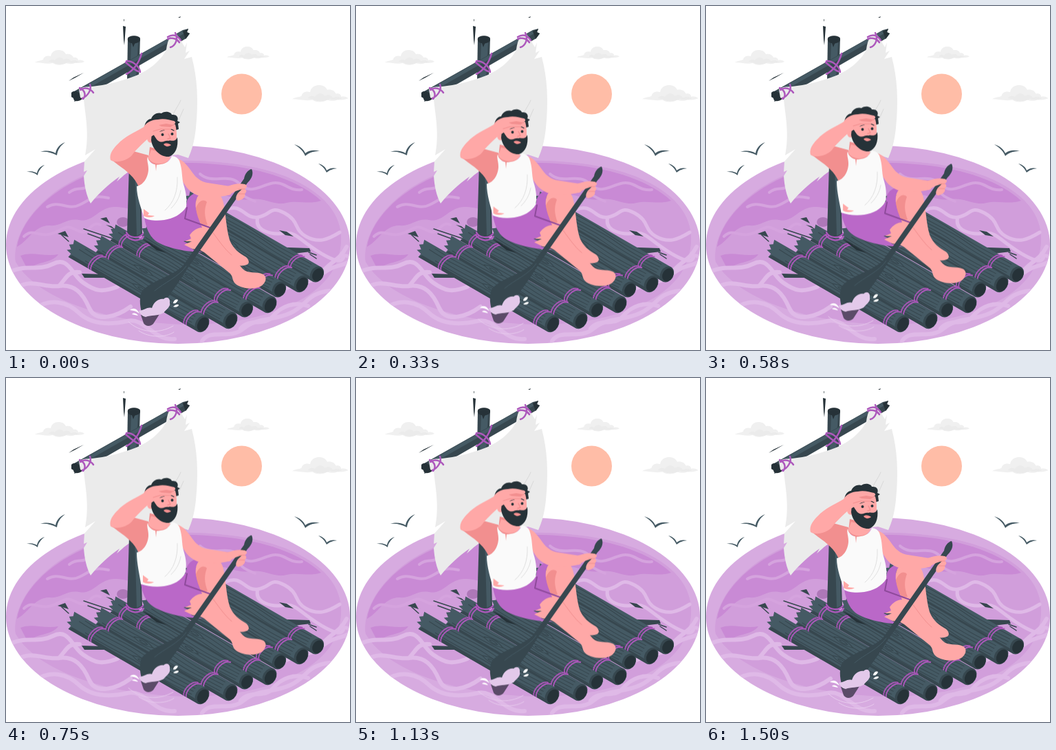
Animation of 500 by 500 pixels, one loop 1.54 s. Source, as an HTML page:

```html
<!DOCTYPE html>
<html lang="en">
<head>
<meta charset="utf-8">
<title>Castaway</title>
<style>
html, body { margin: 0; width: 100%; height: 100%; overflow: hidden; background: #fff; }
svg { display: block; width: 100vw; height: 100vh; }
.dark { fill: #263238; }
.wood { fill: #37474f; }
.bark { fill: #455a64; }
.skin { fill: #ffa8a7; }
.shade { fill: #f28f8f; }
.line { fill: none; stroke-linecap: round; stroke-linejoin: round; }
</style>
</head>
<body>
<svg viewBox="0 0 500 500">
  <defs>
    <clipPath id="lake"><ellipse cx="250" cy="347" rx="250" ry="144"/></clipPath>
    <g id="cloud">
      <path fill="#f0f0f0" d="M0 18C5 15 8 16 12 14C13 8 20 8 23 9C24 3 29 0 34 0C40 0 43 2 45 6C50 5 55 7 56 11C60 10 63 12 63 15C67 14 70 15 72 17C68 19 63 19 58 19C54 21 48 20 45 19C39 23 30 22 26 19C18 21 8 18 0 18Z"/>
      <path fill="#ebebeb" d="M20 17C24 12 27 14 29 15C33 9 40 10 42 14C46 11 51 13 52 16C56 15 61 15 64 17C58 19 54 19 48 18C40 22 31 21 26 18Z"/>
    </g>
  </defs>

  <use href="#cloud" x="42" y="64"/>
  <use href="#cloud" transform="translate(321 59) scale(.86)"/>
  <use href="#cloud" transform="translate(416 115) scale(1.13)"/>
  <circle cx="342.500" cy="128" r="29.500" fill="#ffbda7"/>

  <g clip-path="url(#lake)">
    <rect y="200" width="500" height="300" fill="#d7abe0"/>
    <path fill="#d19edb" d="M14 372C8 325 55 268 122 243C210 217 330 219 405 247C475 275 498 318 483 366C470 410 420 440 350 455C240 478 60 450 14 372Z"/>
    <path fill="#c98ad5" d="M16 350C22 312 60 272 112 249C180 227 250 224 316 231C375 237 428 255 458 283C440 289 424 282 408 286C389 291 377 278 356 281C330 284 321 270 299 276L205 293C184 302 172 288 150 293C132 298 124 315 106 311C88 308 79 321 64 319C42 318 34 340 16 350Z"/>
    <path fill="#c98ad5" d="M21 363C38 356 56 365 76 361C66 375 41 371 32 384Z"/>
    <g class="line" stroke="#dfb9e7" stroke-width="6">
      <path d="M0 390C25 373 45 387 68 375S95 390 112 402S139 417 162 408M15 410C38 395 54 410 77 407S112 418 121 439S159 453 181 437M40 440C66 424 89 430 106 446S149 464 176 458S213 487 245 484M77 407C88 396 89 385 107 387"/>
      <path d="M285 487C297 468 325 486 345 469S389 458 414 446S437 418 470 414M341 469C354 453 376 466 388 451S420 429 439 436M403 412C427 400 440 405 459 390S484 380 500 371M452 396C470 370 484 372 495 350"/>
      <path stroke-width="5" d="M320 296C344 286 346 310 366 307S383 289 405 301S418 325 436 335S467 340 485 329M366 307C360 328 388 333 405 330S433 347 466 364S485 357 497 364"/>
    </g>
    <g class="line" stroke="#d5a3de" stroke-width="4">
      <path d="M26 335C40 322 47 337 66 331S85 316 103 326S122 311 137 318M60 292C78 281 89 298 107 289S127 274 149 279M282 244C299 260 323 242 339 258S366 263 385 258S411 270 430 267M341 258C333 273 350 279 362 284M92 271C104 261 111 270 122 260"/>
    </g>
    <ellipse cx="170" cy="314" rx="9" ry="7" fill="#ae78b8"/>
  </g>

  <g class="bark" id="birds">
    <path d="M50 212C59 209 67 211 72 214C73 207 78 201 86 198C79 203 75 209 74 217C66 213 59 211 50 212Z"/>
    <path d="M30 241C36 239 42 241 45 243C46 237 50 233 56 231C50 236 47 240 46 246C41 242 36 241 30 241Z"/>
    <path d="M419 201C428 204 433 209 435 214C441 209 449 209 456 211C449 211 441 212 435 218C432 211 427 206 419 201Z"/>
    <path d="M454 229C461 231 465 235 466 239C471 235 476 235 481 236C475 237 471 238 466 242C463 236 460 233 454 229Z"/>
  </g>

  <path class="wood" d="M177 47L195 47L193 107L176 107Z"/>
  <path class="bark" d="M182 54L192 52L189 103L180 103Z"/>
  <path class="dark" d="M177 47C179 42 193 42 195 47C196 54 189 53 187 55L185 60L183 54C179 54 176 51 177 47ZM170 29L174 30L172 57L171 49ZM171 20L172 19L172 23ZM250 17L254 15L253 17ZM91 109L98 104L113 97L101 104Z"/>
  <path class="wood" d="M96 126L101 123L257 35L265 33L263 38L267 40L262 47L108 136L99 139L101 134L95 132Z"/>
  <path class="bark" d="M110 119L256 36L259 40L112 124Z"/>
  <path class="dark" d="M95 126C100 121 109 125 111 135C105 140 98 139 98 134L95 132ZM257 37L265 33L263 38L267 40L261 48Z"/>
  <path fill="#ebebeb" d="M106 121C112 116 121 118 125 117C145 115 165 110 184 103C203 97 226 80 233 63C235 50 238 41 248 41C253 47 256 54 260 60L263 53L261 68L267 65L259 77L270 74C278 104 280 137 276 177C274 197 270 210 265 221L250 216C218 220 185 233 168 249L161 255L165 248C149 259 134 273 123 287C117 276 114 262 113 247L118 239L113 241L114 226L130 208L115 217C121 187 116 163 113 136L108 133Z"/>
  <path class="line" stroke="#d8d8d8" d="M254 137C251 145 245 151 242 160M258 150L250 168"/>
  <g class="line" stroke="#ad58bc" stroke-width="2.500">
    <path d="M108 122C114 117 123 120 127 126M107 119C116 123 116 131 112 135M122 114C125 121 119 131 111 134"/>
    <path d="M175 80C184 79 194 88 195 96M197 69C194 82 185 94 175 99M174 82C181 88 187 93 192 95"/>
    <path d="M235 45C243 40 250 43 254 50M246 39C251 48 246 58 239 60M235 48C242 45 249 48 252 53"/>
  </g>

  <path class="wood" d="M110 389L143 390L150 395L114 395ZM380 350L441 352L443 357L400 362ZM397 326L408 328L418 335L406 333ZM75 331L86 327L91 336ZM137 309L146 307L151 316ZM145 318L153 320L162 327Z"/>
  <path class="line" stroke="#37474f" stroke-width="1.500" d="M113 324L155 338M119 331L149 342M440 358L451 362M442 361L451 367M81 333L91 342"/>
  <g id="raft"></g>
  <path class="dark" d="M200 340L209 344L233 359L219 355Z"/>
  <path class="wood" d="M179 230L195 230L198 333C193 338 181 337 176 331Z"/>
  <path class="bark" d="M187 230L193 230L196 331L190 334Z"/>
  <path class="line" stroke="#ad58bc" stroke-width="2.200" d="M175 329C179 337 193 339 199 331M174 333C181 342 193 343 200 335"/>

  <g id="man">
    <path id="shorts" fill="#ba68c8"/>
    <path class="skin" d="M276 294C274 279 281 270 293 268C304 267 314 274 316 286C320 305 320 323 325 340C330 353 339 359 349 365C354 370 354 374 350 376C341 379 331 378 325 371C311 356 289 338 285 322C281 313 279 304 276 294Z"/>
    <path class="shade" d="M276 294C279 285 286 279 292 285C288 295 288 305 293 318L285 320C280 311 277 303 276 294Z"/>
    <path class="line" stroke="#8e4a9b" stroke-width="2" d="M263 293L260 309L296 322"/>
    <path class="skin" d="M270 342L260 342L269 338L267 333C273 324 284 319 294 324C303 329 309 339 317 351L344 382C352 390 363 385 374 390C380 394 378 402 371 407C360 413 344 411 335 405C328 400 331 395 326 389L288 358C281 353 275 354 271 353L259 347Z"/>
    <path class="line" stroke="#f28f8f" d="M297 324C307 338 318 354 328 362"/>

    <path class="shade" d="M154 224L185 211L207 217C211 236 207 257 193 263C187 249 176 240 163 231Z"/>
    <path class="shade" d="M209 205L233 211L235 226C229 234 215 235 207 223Z"/>
    <path class="skin" d="M207 221L211 209L232 215L239 220C236 231 213 233 207 221Z"/>
    <path class="skin" d="M247 221C260 224 266 236 274 246C279 252 286 256 293 257L325 262L327 274C308 279 289 279 278 275C265 270 258 258 253 248Z"/>
    <path id="shirt" fill="#fafafa"/>
    <path class="line" stroke="#e0e0e0" d="M249 249C250 269 244 286 231 297M254 268C252 280 246 288 240 294"/>
    <path class="shade" d="M217 229L219 230L218 240Z"/>
    <path id="rip" class="skin" d="M200 295L208 301L206 304L216 305C211 308 205 308 200 305Z"/>

    <path class="dark" d="M202 184C199 172 205 164 211 164C213 157 221 154 226 156C231 152 240 154 241 158C249 157 251 163 249 167L253 169L250 171L251 179L245 181L212 190Z"/>
    <path class="skin" d="M214 174L246 172C249 184 249 198 244 209C234 215 220 209 214 202Z"/>
    <path class="skin" d="M214 190C208 185 203 190 206 196C208 200 213 199 215 197Z"/>
    <path class="dark" d="M212 184C216 187 217 194 223 197C229 199 231 195 236 196C241 194 245 199 249 191C251 205 246 216 237 219C225 220 213 209 211 195Z"/>
    <path fill="#f28f8f" d="M229 201C233 198 237 200 240 202C236 205 232 205 229 201Z"/>
    <circle class="dark" cx="227.500" cy="187" r="2"/><circle class="dark" cx="241.500" cy="186" r="2"/>
    <path class="line" stroke="#263238" stroke-width="1.300" d="M224 182L230 180M240 179L244 181"/>
    <path class="line" stroke="#f28f8f" stroke-width="1.300" d="M236 186L239 192L235 193"/>
    <path class="skin" d="M152 224C149 214 158 205 166 197C178 187 190 182 200 176C204 169 212 165 221 165C230 163 238 166 244 167C248 169 246 172 242 173C248 173 247 177 242 178C237 180 228 179 222 183C216 187 211 189 205 194C196 202 188 210 183 217C176 225 160 229 152 224Z"/>
    <path class="shade" d="M222 173L233 171L244 173L239 176L226 175Z"/>
    <path class="line" stroke="#f28f8f" d="M214 182L224 179L239 179"/>

    <path class="line" stroke="#e7cbed" stroke-width="1" d="M178 459C194 474 221 478 243 465M193 472C209 483 232 482 244 474"/>
    <path fill="#5b4b68" d="M196 449L223 448L214 462C209 467 202 465 200 461Z"/>
    <path class="wood" d="M357 237C352 238 347 244 346 251L257 378C240 394 208 400 197 416C193 427 195 439 199 452L222 447C226 432 245 413 264 381L351 257C358 250 360 243 357 237Z"/>
    <path class="line" stroke="#455a64" d="M262 378C251 394 230 402 216 414"/>
    <path fill="#e3c9ea" d="M193 443C202 442 205 437 212 439C215 430 222 425 229 426C234 421 239 425 238 431C240 437 232 442 229 446C220 451 211 449 203 452C198 451 195 448 193 443Z"/>
    <path fill="#fff" d="M180 442C186 437 191 441 194 447C187 442 184 443 180 442ZM183 448C186 445 190 447 192 450C188 449 186 449 183 448ZM243 432C244 426 249 426 250 427C249 431 246 433 243 432ZM243 437C247 433 251 433 251 435C249 438 246 438 243 437Z"/>
    <path class="skin" d="M322 262C331 259 338 257 347 259C352 261 350 264 347 266C351 268 349 271 347 273C349 278 343 282 337 283C332 281 335 275 337 272L343 266L334 269L323 275Z"/>
    <path class="line" stroke="#f28f8f" d="M338 266L347 266M338 273L347 273"/>
  </g>
</svg>
<script>
const raft = document.getElementById('raft');

// each log: right end x, y, radius, length, rope positions
const logs = [
  [452, 390, 12, 222, [-40]],
  [429, 404, 13, 220, [-35]],
  [397, 412, 12, 210, [-30]],
  [383, 434, 13, 215, [-35]],
  [349, 441, 12, 228, [-45, -175, -205]],
  [326, 457, 13, 226, [-40, -200]],
  [285, 462, 13, 224, [-22, -182]]
];

const path = (d, fill, stroke, width) =>
  `<path d="${d}" fill="${fill || 'none'}" ${stroke ? `stroke="${stroke}" stroke-width="${width}"` : ''}/>`;

function rope(x, r) {
  const arc = dx => `M${x + dx + 8} ${-r - 1}C${x + dx - 3} ${-r + 1} ${x + dx - 7} ${r - 5} ${x + dx - 1} ${r}`;
  return path(arc(0) + arc(4), '', '#ad58bc', 1.9) +
    `<path d="${arc(0)}" fill="none" stroke="#7b4486" stroke-width=".7" stroke-dasharray="1 2"/>`;
}

function log([x, y, r, len, ropes], i) {
  const l = -len;
  const edge = `L${l + 7} ${r}L${l + 8} ${r * .55}L${l} ${r * .4}L${l + 5} ${r * .1}L${l - 1} ${-r * .25}L${l + 4} ${-r * .5}L${l + 2} ${-r}Z`;
  let s = path(`M0 ${-r}C8 ${-r} 8 ${r} 0 ${r}${edge}`, '#455a64');
  s += path(`M0 ${r}L${l + 7} ${r}L${l + 10} ${r * .62}L-8 ${r * .65}Z`, '#37474f');
  for (let k = 0; k < 4; k++) {
    const h = r * (-.72 + k * .38), a = l + 10 + (i * 17 + k * 23) % 30;
    s += path(`M${a} ${h}C${a + 40} ${h + 3} ${a + 65} ${h - 3} ${a + 98} ${h}S${a + 145} ${h + 2} -14 ${h}`, '', '#37474f', 1.1);
  }
  const knot = l + 55 + (i * 43) % 95;
  s += path(`M${knot - 16} 0Q${knot} -7 ${knot + 16} 0Q${knot} 6 ${knot - 16} 0M${knot - 7} 0Q${knot} -3 ${knot + 7} 0Q${knot} 3 ${knot - 7} 0`, '#455a64', '#37474f', 1.1);
  s += `<ellipse rx="9.500" ry="${r}" fill="#37474f"/><ellipse cx="1.500" rx="7.500" ry="${r - 2}" fill="#263238"/>`;
  s += ropes.map(p => rope(p, r)).join('');
  return `<g transform="translate(${x} ${y}) rotate(30)">${s}</g>`;
}
raft.innerHTML = logs.map(log).join('');

// dx: sideways shift of the waist
const shirt = dx => `M206 219C208 230 217 232 225 230C234 229 239 224 241 218C246 218 250 221 252 225C257 239 255 248 258 259C262 272 263 281 ${262 + dx / 3} 292C255 303 243 309 230 311C217 313 206 311 ${201 + dx} 308C${197 + dx / 2} 295 190 279 190 262C201 260 207 247 207 237C207 229 204 224 206 219Z`;
const shorts = dx => `M${201 + dx} 307C216 312 246 309 262 291C262 280 267 275 277 271L295 268L277 280C274 294 279 308 290 321L269 333L272 339L258 342L274 349L269 353L286 358C255 357 229 350 ${217 + dx / 2} 341C${208 + dx} 334 ${203 + dx} 321 ${201 + dx} 307Z`;

// rise until 730 ms, sink until 1460 ms, then rest to the end of the loop
const loop = 1540, peak = 730;
const move = (id, low, high) => document.getElementById(id).animate(
  [low, { ...high, offset: peak / loop }, { ...low, offset: 2 * peak / loop }, low]
    .map(step => ({ ...step, easing: 'cubic-bezier(.37,0,.63,1)' })),
  { duration: loop, iterations: Infinity });
const slide = (id, x, y) => move(id, { transform: 'translate(0,0)' }, { transform: `translate(${x}px,${y}px)` });
const morph = (id, shape) => move(id, { d: `path("${shape(0)}")` }, { d: `path("${shape(-5)}")` });

slide('man', 0, -8.5);
slide('rip', -1, 0);
morph('shirt', shirt);
morph('shorts', shorts);
</script>
</body>
</html>
```
